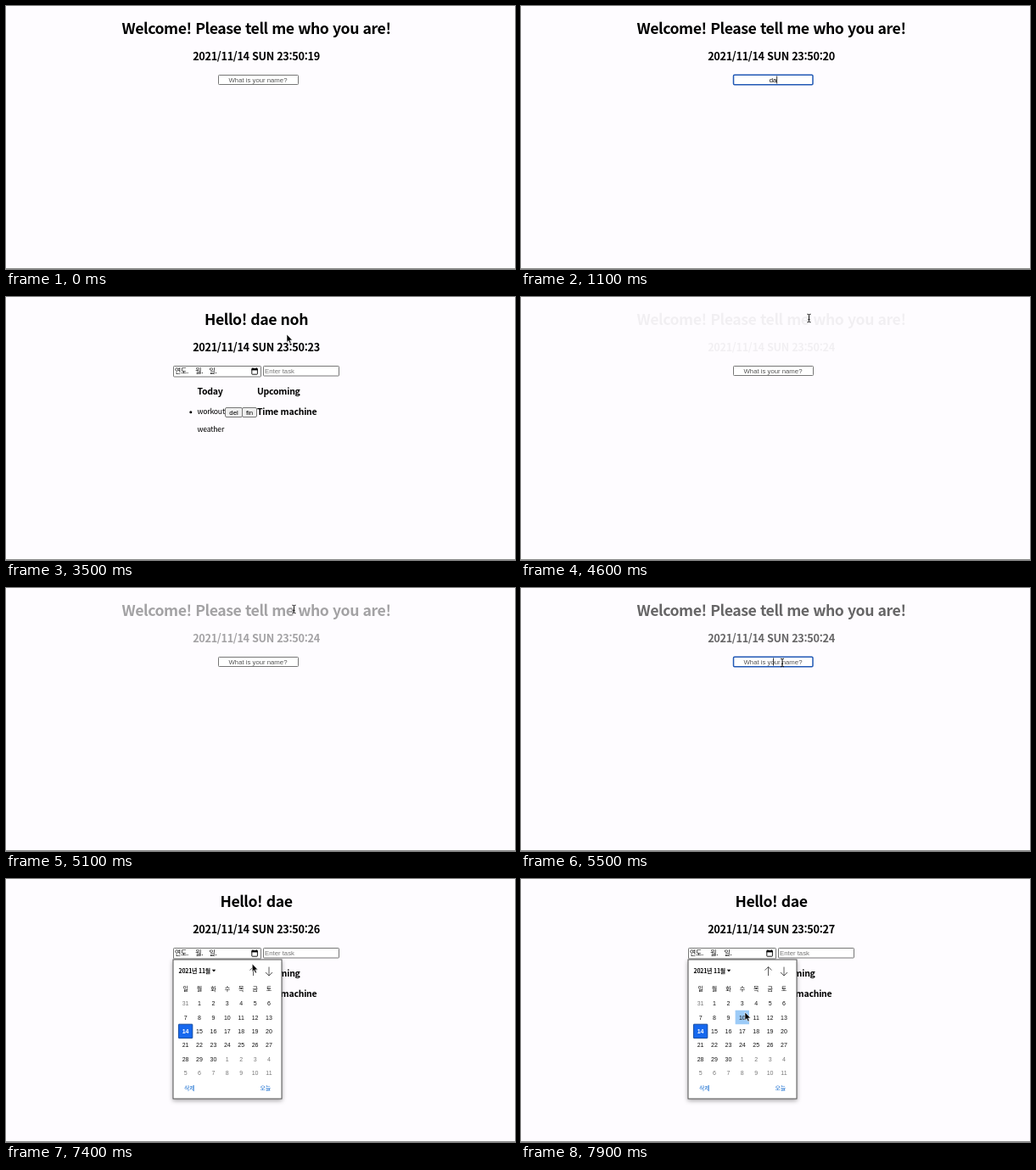
Recreate the animation shown at these times as an HTML page. Size 600 px wide and 310 px high, loop 8000 ms.

```html
<!DOCTYPE html>
<html lang="ko">
<head>
<meta charset="utf-8">
<title>To-do page</title>
<style>
  html, body { margin: 0; width: 100%; height: 100%; overflow: hidden; background: #fefcff; }
  svg { display: block; white-space: pre; }
  .page { font-family: "Noto Sans CJK KR", "Noto Sans", sans-serif; letter-spacing: -.025em; font-feature-settings: "calt" 0; }
  .form { font-family: "Liberation Sans", "Noto Sans CJK KR", sans-serif; }
</style>
</head>
<body>
<svg id="stage" width="600" height="310" viewBox="0 0 600 310"></svg>
<script>
const LOOP = 8000, STEP = 100;
const CENTER = 295, FIELD_SIZE = 7.75;
const stage = document.getElementById('stage');
const ruler = document.createElement('canvas').getContext('2d');
ruler.font = `${FIELD_SIZE}px "Liberation Sans", sans-serif`;

// Every timeline is a list of [start, value, ...]; the latest started entry counts.
const latest = (list, t) => list.filter(entry => entry[0] <= t).pop();

const seconds = [[0, 19], [300, 20], [1300, 21], [2300, 22], [3300, 23], [4300, 24], [5600, 25], [6600, 26], [7600, 27]];
const scenes = [[0, 'ask'], [2900, 'dae noh'], [4600, 'ask'], [5900, 'dae']];
const typed = [
  [0, ''], [900, 'd'], [1100, 'da'], [1300, 'dae'], [2500, 'dae '], [2600, 'dae n'], [2700, 'dae no'], [2800, 'dae noh'],
  [4600, ''], [5600, 'd'], [5700, 'da'], [5800, 'dae']
];
const focus = [[0, false], [600, true], [4600, false], [5500, true]];
const caret = [[0, true], [1800, false], [2300, true]];
const pointer = [
  [0, '', 303, 36], [100, 'beam', 303, 36], [200, 'arrow', 304, 46], [500, 'beam', 308, 88], [900, '', 308, 88],
  [3300, 'arrow', 312, 80], [3500, 'arrow', 331, 44], [3600, 'arrow', 331, 44], [3900, 'beam', 339.5, 25],
  [5200, 'beam', 339.5, 25], [5500, 'beam', 308, 88], [5600, '', 308, 88], [6500, 'beam', 308, 88],
  [6700, 'arrow', 295.5, 88.5], [7300, 'arrow', 295.5, 88.5], [7900, 'arrow', 264, 157]
];

const text = (x, y, size, content, { weight = 400, fill = '#000', anchor = 'start', font = 'page' } = {}) =>
  `<text class="${font}" x="${x}" y="${y}" font-size="${size}" font-weight="${weight}" fill="${fill}" text-anchor="${anchor}">${content}</text>`;
const rect = (x, y, w, h, fill, stroke = 'none', radius = 0, extra = '') =>
  `<rect x="${x}" y="${y}" width="${w}" height="${h}" rx="${radius}" fill="${fill}" stroke="${stroke}" ${extra}/>`;
const path = (d, extra) => `<path d="${d}" ${extra}/>`;
const field = (x, y, w, h) => rect(x, y, w, h, '#fff', '#767676', 0.8);
const middle = { anchor: 'middle', weight: 700 };

function heading(title, t) {
  const fade = t < 4600 ? 1 : Math.min(1, (t - 4520) / 1640);
  return `<g opacity="${fade}">` +
    text(CENTER, 33, 17.7, title, middle) +
    text(CENTER, 64.4, 12.7, `2021/11/14 SUN 23:50:${latest(seconds, t)[1]}`, middle) + '</g>';
}

function nameField(t) {
  const value = latest(typed, t)[1], focused = latest(focus, t)[1];
  const frame = focused
    ? rect(250.5, 81.3, 93.5, 11.4, '#fff', '#2259b5', 1.2, 'stroke-width="1.5"')
    : field(250.5, 81.5, 94, 11);
  const label = text(297, 89.6, FIELD_SIZE, value || 'What is your name?',
    { anchor: 'middle', font: 'form', fill: value ? '#000' : '#555' });
  const caretX = 297 + ruler.measureText(value).width / 2;
  return frame + label + (focused && latest(caret, t)[1] ? rect(caretX, 82.5, 0.8, 9, '#000') : '');
}

function button(x, width, label) {
  return rect(x, 130.5, width, 11, '#efefef', '#767676', 1.5) +
    text(x + width / 2, 138.7, FIELD_SIZE, label, { anchor: 'middle', font: 'form' });
}

function todo() {
  const bold = { weight: 700 };
  return field(197.5, 81.5, 103, 12.5) +
    text(199, 90.4, 7.9, '연도.') + text(223.3, 90.4, 7.9, '월.') + text(239.5, 90.4, 7.9, '일.') +
    rect(289.8, 85, 6.6, 6.2, 'none', '#000', 0.5, 'stroke-width=".9"') + rect(289.4, 84.2, 7.4, 2.2, '#000') +
    path('M291 83.2v1.5M295.2 83.2v1.5', 'stroke="#000"') +
    field(303.5, 81.5, 89, 11.5) +
    text(305, 90, FIELD_SIZE, 'Enter task', { font: 'form', fill: '#757575' }) +
    text(225.5, 115.3, 10.5, 'Today', bold) + text(296, 115.3, 10.5, 'Upcoming', bold) +
    text(296, 139.3, 10.5, 'Time machine', bold) +
    '<circle cx="217.8" cy="135.7" r="1.5"/>' +
    text(225.5, 138, 8.7, 'workout') + text(225.5, 159, 8.7, 'weather') +
    button(258.5, 20, 'del') + button(278.5, 17, 'fin');
}

function calendar(mouse) {
  const pitch = 16.4, size = 7, left = 203.4, top = 138.4, today = 14;
  const cell = (index, fill, stroke) =>
    rect(left + index % 7 * pitch, top + Math.floor(index / 7) * pitch, pitch, pitch, fill, stroke, 0.5);
  const columnCenter = i => left + (i % 7 + 0.5) * pitch;
  const link = { fill: '#1a6fd0' };
  let out = rect(197, 95, 128, 164, '#fff', '#555', 0, 'style="filter:drop-shadow(0 2px 2.5px #0005)"') +
    text(203.5, 110.5, 6.9, '2021년 11월', { weight: 700 }) +
    path('M242.8 106.7h4.4l-2.2 2.7z', '') +
    path('M291.5 114v-10.4m-4 4 4-4 4 4M310 103.6v10.4m-4-4 4 4 4-4', 'fill="none" stroke="#333" stroke-width=".8"') +
    text(210, 249, 7, '삭제', link) + text(299.5, 249, 7, '오늘', link);
  [...'일월화수목금토'].forEach((day, i) =>
    out += text(columnCenter(i), 132.2, size, day, { anchor: 'middle' }));

  const column = Math.floor((mouse.x - left) / pitch), row = Math.floor((mouse.y - top) / pitch);
  if (row >= 0 && column >= 0 && column < 7) out += cell(row * 7 + column, '#9ccbf7');
  out += cell(today, '#1668ee', '#10489f');

  for (let i = 0; i < 42; i++) {
    const date = new Date(2021, 9, 31 + i);
    out += text(columnCenter(i), top + Math.floor(i / 7) * pitch + 10.8, size, date.getDate(), {
      anchor: 'middle', font: 'form', weight: i === today ? 700 : 400,
      fill: i === today ? '#fff' : date.getMonth() === 10 ? '#111' : '#777'
    });
  }
  return out;
}

function mouseAt(t) {
  const from = latest(pointer, t), to = pointer[pointer.indexOf(from) + 1] || from;
  const k = to === from ? 0 : (t - from[0]) / (to[0] - from[0]);
  return { kind: from[1], x: from[2] + (to[2] - from[2]) * k, y: from[3] + (to[3] - from[3]) * k };
}

function cursor({ kind, x, y }) {
  const shapes = {
    '': '',
    arrow: path('M0 0V9.4L2.1 7.5 3.6 11 5.2 10.3 3.7 6.9H6.6Z', 'stroke="#fff" stroke-width=".6"'),
    beam: path('M-2-4.8Q0-4.8 0-3.5Q0-4.8 2-4.8M-2 4.8Q0 4.8 0 3.5Q0 4.8 2 4.8M0-3.5V3.5M-1 1.5H1', 'fill="none" stroke="#111"')
  };
  return `<g transform="translate(${x} ${y})">${shapes[kind]}</g>`;
}

function draw(t) {
  const scene = latest(scenes, t)[1], mouse = mouseAt(t);
  const body = scene === 'ask'
    ? heading('Welcome! Please tell me who you are!', t) + nameField(t)
    : heading(`Hello! ${scene}`, t) + todo();
  return rect(0, 0, 600, 310, '#fefcff') + rect(0, 309, 600, 1, '#8a8a8a') + body +
    (t >= 7300 ? calendar(mouse) : '') + cursor(mouse);
}

let shown = -1;
function tick() {
  const t = Math.floor(performance.now() % LOOP / STEP) * STEP;
  if (t !== shown) stage.innerHTML = draw(shown = t);
  requestAnimationFrame(tick);
}
tick();
</script>
</body>
</html>
```
